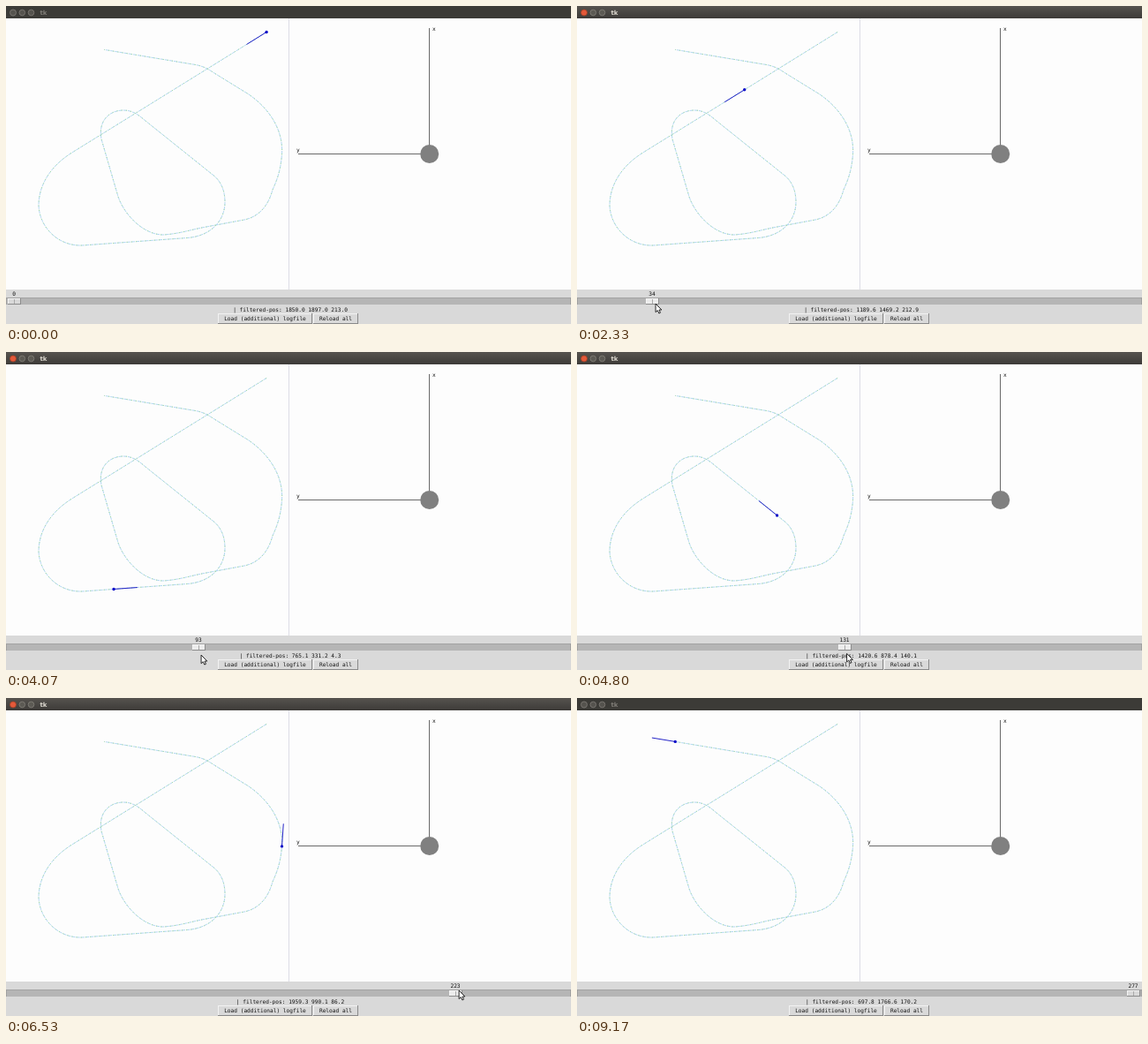
These frames come from a looping animation (640 px wide and 360 px high, 9230 ms). An HTML page:

```html
<!DOCTYPE html>
<html lang="en">
<head>
<meta charset="utf-8">
<title>tk</title>
<style>
  html, body { margin: 0; width: 100%; height: 100%; overflow: hidden; background: #d9d9d9; }
  svg { display: block; width: 100vw; height: 100vh; }
  text { font: 6.17px "DejaVu Sans Mono", monospace; fill: #111; }
  .mid { text-anchor: middle; }
  rect { shape-rendering: crispEdges; }
  .bar { fill: url(#bar); }
  .title { font: bold 7px "DejaVu Sans", sans-serif; fill: #dfdbd2; }
  .knob { fill: #5c5a54; stroke: #85827a; stroke-width: .8; }
  .close { fill: #e4593a; stroke: #a04028; }
  .idle .bar { fill: #3c3b37; }
  .idle .title { fill: #807d78; }
  .idle .knob { fill: #55534e; stroke: #807d78; }
  .track { fill: none; stroke-width: 1; }
</style>
</head>
<body>
<svg viewBox="0 0 640 360">
  <defs>
    <linearGradient id="bar" x2="0" y2="1">
      <stop stop-color="#56534f"/><stop offset="1" stop-color="#3d3b38"/>
    </linearGradient>
  </defs>
  <rect width="640" height="360" fill="#d9d9d9"/>

  <g id="titlebar">
    <rect class="bar" width="640" height="14"/>
    <circle class="knob close" cx="8" cy="7.5" r="3.5"/>
    <circle class="knob" cx="18.3" cy="7.5" r="3.3"/>
    <circle class="knob" cx="28.5" cy="7.5" r="3.3"/>
    <text class="title" x="38.5" y="10">tk</text>
  </g>

  <rect y="14" width="640" height="307" fill="#fdfdfd"/>
  <rect x="320" y="14" width="1" height="307" fill="#dcdce6"/>

  <path class="track" id="trackBase" stroke="#b4d8f2" stroke-dasharray="4.2 1"/>
  <path class="track" id="trackDots" stroke="#a4dca8" stroke-dasharray="1.2 4"/>
  <line id="heading" stroke="#2424c8"/>
  <circle id="dot" r="1.7" fill="#0808c8"/>

  <path d="M479.5 25V158M331 167.5H470" stroke="#6a6a6a" fill="none"/>
  <circle cx="479.7" cy="167.5" r="10.5" fill="#808080"/>
  <text x="483" y="27.5">x</text>
  <text x="329" y="165">y</text>

  <text id="value" class="mid" y="328.3"></text>
  <rect y="330" width="640" height="8" fill="#a2a2a2"/>
  <rect x="1" y="331" width="638" height="7" fill="#b5b5b5"/>
  <g id="thumb">
    <rect y="331" width="15" height="7" fill="#8c8c8c"/>
    <rect y="331" width="14" height="6" fill="#f4f4f4"/>
    <rect id="face" x="1" y="332" width="13" height="5"/>
    <rect x="7" y="332" width="1" height="5" fill="#a8a8a8"/>
  </g>

  <text id="readout" class="mid" x="322" y="345.6"></text>
  <g id="buttons"></g>
  <path id="cursor" d="M0 0V9.6L2.2 7.6L3.8 11L5.4 10.2L3.9 7H6.8Z" fill="#fff" stroke="#111" stroke-width=".9"/>
</svg>
<script>
const $ = id => document.getElementById(id);
const setAttrs = (el, attrs) => {
  for (const key in attrs) el.setAttribute(key, attrs[key]);
  return el;
};
const svgEl = (name, attrs) =>
  setAttrs(document.createElementNS('http://www.w3.org/2000/svg', name), attrs);

const LOOP = 9230, LAST = 277, STEP = 2.242;
const HOVER = 870, FOCUS = 960, DRAG = 1050, RELEASE = 8450;
const SCALE_X = .1595, SCALE_Y = .1526, FLOOR = 319, REACH = 168;

// Smooth curve through [x, y] points, held constant outside their range.
function spline(points) {
  const secant = (i, j) => (points[j][1] - points[i][1]) / (points[j][0] - points[i][0]);
  const end = points.length - 1;
  const slopes = points.map((_, i) => secant(Math.max(0, i - 1), Math.min(end, i + 1)));
  slopes[0] = 2 * slopes[0] - slopes[1];
  slopes[end] = 2 * slopes[end] - slopes[end - 1];
  return x => {
    const i = points.findIndex(p => p[0] > x);
    if (i < 1) return points[i < 0 ? end : 0][1];
    const [x0, y0] = points[i - 1], [x1, y1] = points[i];
    const w = x1 - x0, u = (x - x0) / w, v = 1 - u;
    return v * v * ((1 + 2 * u) * y0 + u * w * slopes[i - 1])
      + u * u * ((1 + 2 * v) * y1 - v * w * slopes[i]);
  };
}

// Route of the vehicle, with the log index reached at the end of each leg.
const legs = [
  [0, 'M295.075 29.518'],
  [34, 'C260.075 51.263 224.741 73.139 189.741 94.8'],
  [93, 'L76 165.2C50 181 37 203 37 226C38 251 60 273 88 270.9L122.033 268.459'],
  [173, 'L204 262.6C232 261 248 243 248 222C248 208 243 198.5 236 192.5L157 129.2C150 123 143 118 133 118C118 118 104 129 108.03 150.7L121.922 198.415'],
  [223, 'L126.76 215C133 235 155 259 178 259C196 258 210 253 228 249.8L270 242C289 238 298 223 302 208C307 197 311.2 186 312.508 167.911'],
  [LAST, 'C314.4 140 298 116 275 100L236 76C230 72 224 68 214 66.4L111.299 49.417']
];
let route = '';
const distanceAt = spline(legs.map(([index, d]) => {
  route += d;
  return [index, svgEl('path', { d: route }).getTotalLength()];
}));
const track = setAttrs($('trackBase'), { d: route });
const trackLength = track.getTotalLength();
$('trackDots').setAttribute('d', route);

// Pointer: time, x, y
const pointer = [
  [450, 75, 364], [900, 12.5, 335], [DRAG, 12.5, 335], [2330, 89, 337],
  [4070, 221, 343], [4300, 244, 347], [5570, 401, 332], [6530, 513, 331],
  [7500, 634, 331], [7800, 670, 331]
];
const pointerX = spline(pointer.map(([t, x]) => [t, x]));
const pointerY = spline(pointer.map(([t, , y]) => [t, y]));

function poseAt(index) {
  const s = distanceAt(index);
  const { x, y } = track.getPointAtLength(s);
  const a = track.getPointAtLength(Math.max(0, s - .5));
  const b = track.getPointAtLength(Math.min(trackLength, s + .5));
  const angle = Math.atan2((a.y - b.y) / SCALE_Y, (b.x - a.x) / SCALE_X);
  return { x, y, angle };
}

function addButton(x, width, label) {
  const box = (dx, y, w, h, fill) =>
    $('buttons').append(svgEl('rect', { x: x + dx, y, width: w, height: h, fill }));
  box(0, 348, width, 12, '#8a8a8a');
  box(0, 348, width - 1, 11, '#f2f2f2');
  box(1, 349, width - 2, 10, '#d9d9d9');
  const text = svgEl('text', { class: 'mid', x: x + width / 2, y: 355.8 });
  text.textContent = label;
  $('buttons').append(text);
}
addButton(240, 107, 'Load (additional) logfile');
addButton(348, 51, 'Reload all');

function draw(t) {
  const px = pointerX(t), py = pointerY(t);
  const index = t < DRAG ? 0 : Math.max(0, Math.min(LAST, Math.round((px - 12.5) / STEP)));
  const { x, y, angle } = poseAt(index);

  $('titlebar').setAttribute('class', t >= FOCUS && t < RELEASE ? '' : 'idle');
  setAttrs($('dot'), { cx: x, cy: y });
  setAttrs($('heading'), {
    x1: x, y1: y,
    x2: x + REACH * SCALE_X * Math.cos(angle),
    y2: y - REACH * SCALE_Y * Math.sin(angle)
  });

  const left = Math.round(2 + index * STEP);
  $('thumb').setAttribute('transform', `translate(${left})`);
  $('face').setAttribute('fill', t > HOVER && t < RELEASE ? '#ececec' : '#d9d9d9');
  $('value').setAttribute('x', left + 7);
  $('value').textContent = index;

  const degrees = (angle * 180 / Math.PI + 360) % 360;
  const numbers = [x / SCALE_X, (FLOOR - y) / SCALE_Y, degrees].map(n => n.toFixed(1));
  $('readout').textContent = `| filtered-pos: ${numbers.join(' ')}`;
  $('cursor').setAttribute('transform', `translate(${px} ${py})`);
}

const origin = performance.now();
function tick() {
  draw((performance.now() - origin) % LOOP);
  requestAnimationFrame(tick);
}
tick();
</script>
</body>
</html>
```
